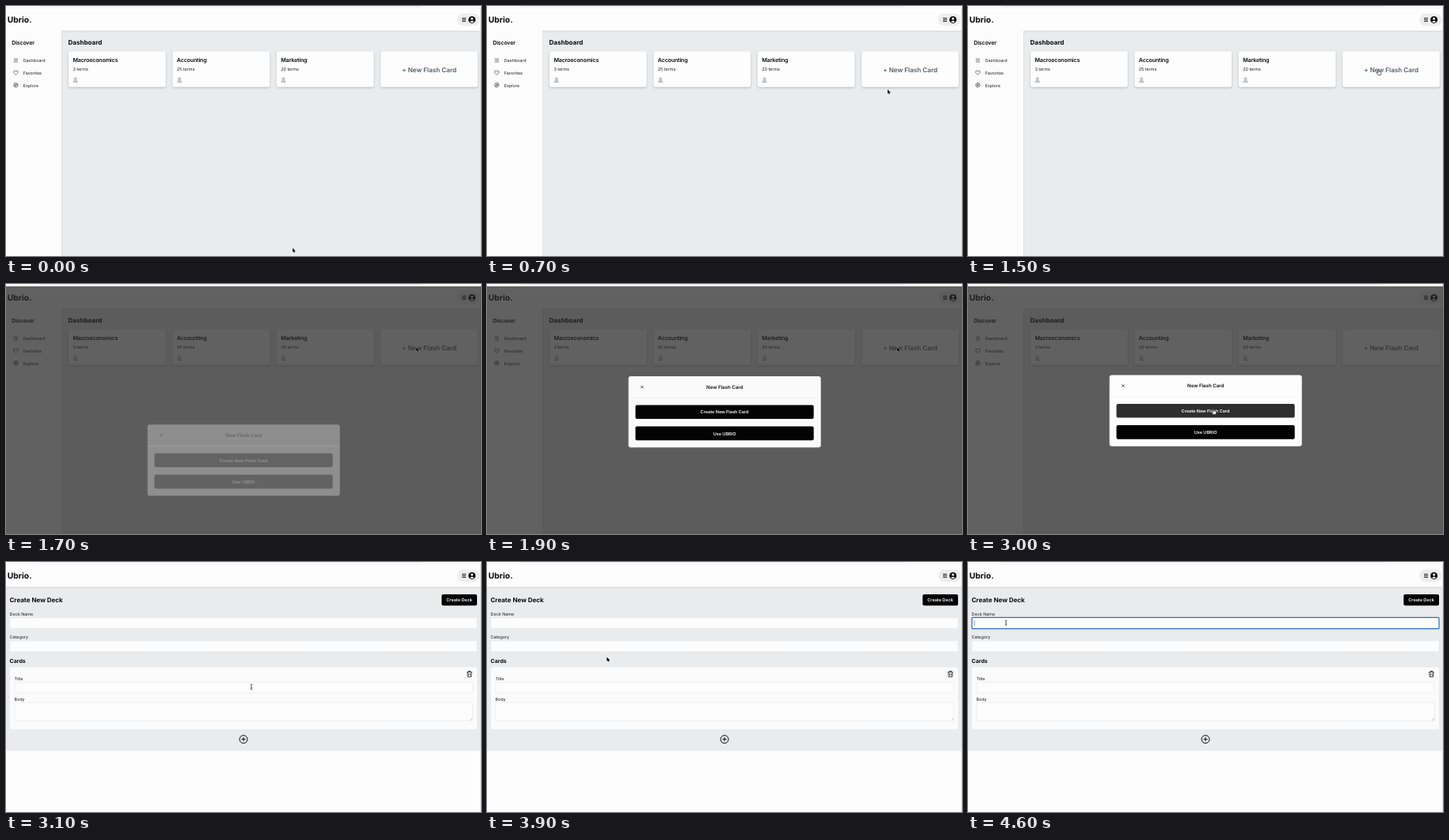
Recreate the animation shown at these times as an HTML page with a canvas. Size 600 by 317 pixels, loop 5000 ms.

```html
<!DOCTYPE html>
<html lang="en">
<head>
<meta charset="utf-8">
<title>Flash card dashboard</title>
<style>
  html, body { margin: 0; width: 100%; height: 100%; overflow: hidden; background: #fdfdfd; }
  canvas { display: block; width: 600px; height: 317px; }
</style>
</head>
<body>
<canvas id="stage"></canvas>
<script>
const W = 600, H = 317, LOOP = 5000, STEP = 100;
const BRAND = 'Ubrio';
const INK = '#0b0b0c', PAPER = '#fdfdfd', GROUND = '#eaebed', EDGE = '#e3e4e6';
const canvas = document.getElementById('stage');
const ctx = canvas.getContext('2d');
const ratio = window.devicePixelRatio || 1;
canvas.width = W * ratio;
canvas.height = H * ratio;

// ---- drawing helpers ----
function rect(x, y, w, h, fill) {
  ctx.fillStyle = fill;
  ctx.fillRect(x, y, w, h);
}

function box(x, y, w, h, r, fill, stroke, width = 0.6) {
  ctx.beginPath();
  ctx.roundRect(x, y, w, h, r);
  if (fill) { ctx.fillStyle = fill; ctx.fill(); }
  if (stroke) { ctx.strokeStyle = stroke; ctx.lineWidth = width; ctx.stroke(); }
}

function text(str, x, y, size, weight = 400, color = INK, align = 'left', track = 0) {
  ctx.font = `${weight} ${size}px Inter, sans-serif`;
  ctx.letterSpacing = `${track * size}px`;
  ctx.textAlign = align;
  ctx.fillStyle = color;
  ctx.fillText(str, x, y);
}

function lines(segments, color = INK, width = 0.7) {
  ctx.beginPath();
  for (const [x1, y1, x2, y2] of segments) { ctx.moveTo(x1, y1); ctx.lineTo(x2, y2); }
  ctx.strokeStyle = color;
  ctx.lineWidth = width;
  ctx.stroke();
}

function path(d, x, y, fill, stroke, width = 0.6) {
  const p = new Path2D(d);
  ctx.save();
  ctx.translate(x, y);
  if (fill) { ctx.fillStyle = fill; ctx.fill(p); }
  if (stroke) { ctx.strokeStyle = stroke; ctx.lineWidth = width; ctx.stroke(p); }
  ctx.restore();
}

function disc(x, y, r, fill, stroke, width = 0.6) {
  ctx.beginPath();
  ctx.arc(x, y, r, 0, Math.PI * 2);
  if (fill) { ctx.fillStyle = fill; ctx.fill(); }
  if (stroke) { ctx.strokeStyle = stroke; ctx.lineWidth = width; ctx.stroke(); }
}

function burger(x, y, w, color, width) {
  lines([-2, 0, 2].map(d => [x, y + d, x + w, y + d]), color, width);
}

function shadowed(color, blur, dy, draw) {
  ctx.save();
  ctx.shadowColor = color;
  ctx.shadowBlur = blur * ratio;
  ctx.shadowOffsetY = dy * ratio;
  draw();
  ctx.restore();
}

// ---- page parts ----
function header() {
  shadowed('rgba(0,0,0,.16)', 2, 0.5, () => rect(0, 3, W, 28.5, PAPER));
  rect(0, 0, W, 3, PAPER);
  rect(43, 0, 482, 0.7, '#e6e6ea');
  rect(0, 2.4, W, 0.6, '#efeff0');
  text(BRAND + '.', 1.8, 21.2, 10.3, 700);
  box(570, 9.5, 28.5, 15.8, 7.9, '#ededee');
  burger(576, 17.4, 5, INK, 0.9);
  disc(588.6, 17.4, 4.5, INK);
  disc(588.6, 15.9, 1.5, PAPER);
  path('M-2.6 2.4Q0 -.4 2.6 2.4Q0 4.3 -2.6 2.4Z', 588.6, 17.7, PAPER);
}

function rightEdge() {
  rect(599.2, 3, 0.8, H - 3, '#d6d7d9');
}

function sidebar() {
  rect(0, 31, 70.5, H - 31, '#fcfcfc');
  rect(70.2, 31, 0.8, H - 31, '#dcdddf');
  text('Discover', 7.3, 49.2, 7, 600, INK, 'left', -0.025);
  burger(9.8, 69, 5.2, '#333', 0.6);
  path('M0 2.6C-1.6 1.3 -2.8 .3 -2.8 -1C-2.8 -2.8 -.7 -3 0 -1.6C.7 -3 2.8 -2.8 2.8 -1C2.8 .3 1.6 1.3 0 2.6Z', 12.4, 84.6, null, '#222');
  disc(12.4, 100.2, 2.6, null, '#222', 0.7);
  path('M-1.3 1.3L-.6 -.6L1.3 -1.3L.6 .6Z', 12.4, 100.2, '#222');
  ['Dashboard', 'Favorites', 'Explore'].forEach((label, i) =>
    text(label, 21.7, 71.1 + i * 15.7, 5.4, 400, '#1b1b1d'));
}

function deckCard(i, name, terms) {
  const x = 79 + i * 131.4;
  shadowed('rgba(0,0,0,.2)', 3, 1.2, () => box(x, 57.5, 122.7, 45.2, 2.6, PAPER));
  if (!name) {
    text('+ New Flash Card', x + 61.4, 83.5, 8.1, 600, '#535d6b', 'center');
    return;
  }
  text(name, x + 5.4, 71.2, 7.1, 600, INK, 'left', -0.025);
  text(`${terms} terms`, x + 5.4, 82.3, 5.4, 400, '#1b1b1d');
  disc(x + 8.7, 92.3, 1.4, null, '#555', 0.55);
  path('M-2.4 2.3C-2.4 -.6 2.4 -.6 2.4 2.3Z', x + 8.7, 94.3, null, '#555', 0.55);
}

function dashboard() {
  rect(0, 0, W, H, GROUND);
  header();
  sidebar();
  text('Dashboard', 78.5, 49.3, 8.05, 700);
  deckCard(0, 'Macroeconomics', 3);
  deckCard(1, 'Accounting', 25);
  deckCard(2, 'Marketing', 20);
  deckCard(3);
  rightEdge();
}

function modal(progress, hover) {
  const y = 115.5 + 90.5 * (1 - progress);
  rect(0, 3, W, H - 3, 'rgba(38,38,38,.72)');
  ctx.save();
  ctx.globalAlpha = progress;
  box(178.7, y, 243, 90.3, 3, PAPER);
  rect(178.7, y + 27.2, 243, 0.5, '#e4e4e5');
  lines([[194.3, y + 11.9, 197.7, y + 15.3], [197.7, y + 11.9, 194.3, y + 15.3]], INK, 0.7);
  text('New Flash Card', 300.2, y + 15.7, 6.1, 600, INK, 'center');
  box(187.5, y + 36.5, 225.2, 17.6, 2, hover ? '#2e2e2e' : '#000');
  text('Create New Flash Card', 300, y + 47.4, 5.5, 600, '#fff', 'center');
  box(187.5, y + 63.6, 225.2, 17.6, 2, '#000');
  text('Use ' + BRAND.toUpperCase(), 300, y + 74.5, 5.5, 600, '#fff', 'center');
  ctx.restore();
}

const FIELDS = [
  { label: 'Deck Name', x: 5, y: 70.5, w: 590, h: 14 },
  { label: 'Category', x: 5, y: 99.8, w: 590, h: 14 },
  { label: 'Title', x: 10.8, y: 152.2, w: 578.6, h: 14 },
  { label: 'Body', x: 10.8, y: 178.2, w: 578.6, h: 23.2 }
];

function trash(x, y) {
  lines([[x - 3.3, y - 2.3, x + 3.3, y - 2.3], [x - 0.9, y - 0.6, x - 0.9, y + 1.9], [x + 0.9, y - 0.6, x + 0.9, y + 1.9]], INK, 0.7);
  path('M-2.6 -2.3L-2.2 3.6H2.2L2.6 -2.3M-1.2 -2.3V-3.6H1.2V-2.3', x, y, null, INK, 0.8);
}

function createPage(focused, caret) {
  rect(0, 0, W, H, PAPER);
  rect(0, 31, W, 208.5, GROUND);
  header();
  text('Create New Deck', 4.4, 51.3, 8, 700);
  box(550.3, 41, 44.7, 14.2, 2, '#000');
  text('Create Deck', 572.6, 50.1, 5.5, 600, '#fff', 'center');
  text('Cards', 4.5, 127.6, 7, 700);
  box(5, 133.6, 590, 78.4, 1.5, '#fbfbfb');
  trash(585.4, 142);
  for (const f of FIELDS) {
    text(f.label, f.x - 0.4, f.y - 2.4, 5.4, 400, '#1b1b1d');
    box(f.x, f.y, f.w, f.h, 1, '#fcfcfc', EDGE);
  }
  lines([[586.6, 200.6, 588.8, 198.4], [587.8, 200.6, 588.8, 199.6]], '#777', 0.4);
  disc(300, 224.8, 5, null, INK, 1);
  lines([[297.4, 224.8, 302.6, 224.8], [300, 222.2, 300, 227.4]], INK, 1);
  if (focused) {
    box(5, 70.4, 590, 14.3, 1, '#fcfcfc', '#2a6fc9', 1.2);
    if (caret) lines([[8.2, 74.2, 8.2, 80.8]], '#333', 0.5);
  }
  rightEdge();
}

// ---- pointer ----
const MOVES = [
  { from: 200, to: 800, a: [362, 307], b: [517.5, 90] },
  { from: 800, to: 1100, a: [517.5, 90], b: [518.3, 81.4] },
  { from: 1300, to: 1500, a: [518.3, 81.4], b: [518.3, 80.5] },
  { from: 2200, to: 2800, a: [518, 80.2], b: [310, 158.3] },
  { from: 3700, to: 4000, a: [309.8, 158.4], b: [96, 107.5] },
  { from: 4100, to: 4400, a: [96, 107.5], b: [48, 77] }
];

function pointerAt(t) {
  let move = MOVES[0];
  for (const m of MOVES) if (t >= m.from) move = m;
  const p = Math.min(1, Math.max(0, (t - move.from) / (move.to - move.from)));
  const e = p * p * (3 - 2 * p);
  return move.a.map((v, i) => v + (move.b[i] - v) * e);
}

function inside([px, py], x, y, w, h) {
  return px >= x && px <= x + w && py >= y && py <= y + h;
}

const CURSORS = {
  arrow([x, y]) {
    path('M0 0V5L1.2 4L2 5.8L2.9 5.4L2.1 3.7H3.7Z', x, y, '#000', '#fff', 0.5);
    path('M0 0V5L1.2 4L2 5.8L2.9 5.4L2.1 3.7H3.7Z', x, y, '#000');
  },
  hand([x, y]) {
    path('M-.6 .5Q0 -.4 .6 .5V2.7L3 3.2Q3.8 3.5 3.6 4.4L3 7.2H-.3L-2.1 4.6Q-2.2 3.6 -1.3 4L-.6 4.6Z', x, y, '#fff', '#222', 0.6);
    lines([[x + 0.6, y + 5, x + 0.6, y + 6.4], [x + 1.8, y + 5, x + 1.8, y + 6.4]], '#444', 0.35);
  },
  beam([x, y]) {
    path('M-1.3 -3.2Q0 -3.2 0 -2.4Q0 -3.2 1.3 -3.2M0 -2.4V2.4M-1.3 3.2Q0 3.2 0 2.4Q0 3.2 1.3 3.2M-.6 .9H.6', x, y, null, '#222', 0.7);
  }
};

// ---- timeline ----
// cubic-bezier(.4, 0, .2, 1)
function glide(x) {
  if (x <= 0) return 0;
  if (x >= 1) return 1;
  let lo = 0, hi = 1, s = 0.5;
  for (let i = 0; i < 24; i++) {
    s = (lo + hi) / 2;
    const u = 1 - s;
    if (1.2 * u * u * s + 0.6 * u * s * s + s * s * s < x) lo = s; else hi = s;
  }
  return s * s * (3 - 2 * s);
}

function draw(t) {
  ctx.setTransform(ratio, 0, 0, ratio, 0, 0);
  ctx.textBaseline = 'alphabetic';
  ctx.textRendering = 'geometricPrecision';
  const pos = pointerAt(t);
  let kind = 'arrow';
  if (t < 1700) {
    dashboard();
    if (inside(pos, 473, 57.5, 123, 45.2)) kind = 'hand';
  } else if (t < 3100) {
    const hover = inside(pos, 187.5, 152, 225, 17.6);
    dashboard();
    modal(glide((t - 1600) / 360), hover);
    if (hover) kind = 'hand';
  } else {
    createPage(t >= 4500, t >= 4600);
    if (FIELDS.some(f => inside(pos, f.x, f.y, f.w, f.h))) kind = 'beam';
  }
  CURSORS[kind](pos);
}

const start = performance.now();
function tick() {
  const t = (performance.now() - start) % LOOP;
  draw(Math.floor(t / STEP) * STEP);
  requestAnimationFrame(tick);
}
tick();
</script>
</body>
</html>
```
